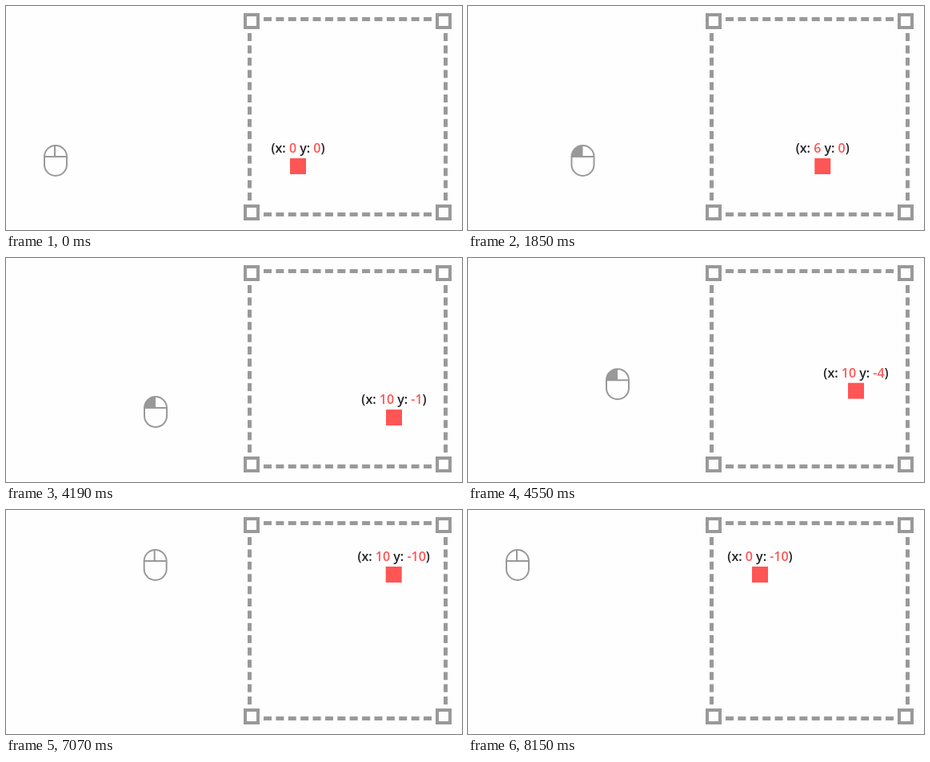
These frames come from a looping animation (570 px wide and 281 px high, 8900 ms). An HTML page:

```html
<!DOCTYPE html>
<html lang="en">
<head>
<meta charset="utf-8">
<title>Drag coordinates</title>
<style>
  html, body { margin: 0; width: 100%; height: 100%; overflow: hidden; background: #fefefe; }
  svg { display: block; width: 570px; height: 281px; }
  text { font: 600 16px "Open Sans", sans-serif; text-anchor: middle; fill: #222; }
  .red { fill: #f55; }
  .frame, .mouse { fill: none; stroke: #999; }
</style>
</head>
<body>
<svg viewBox="0 0 570 281">
  <g class="frame" stroke-width="5" stroke-dasharray="10 5.385">
    <path d="M322 16.5H532M322 261.5H532M304.5 34V244M549.5 34V244"/>
  </g>
  <g class="frame" stroke-width="4">
    <path d="M299 11h16v16h-16zM539 11h16v16h-16zM299 251h16v16h-16zM539 251h16v16h-16z"/>
  </g>
  <g id="mouse" class="mouse" stroke-width="2">
    <path id="button" d="M14 1A13 14 0 0 0 1 15H14z" fill="#999" stroke="none"/>
    <rect x="1" y="1" width="28" height="38" rx="14"/>
    <path d="M14 1V15M1 15H29"/>
  </g>
  <g id="box">
    <rect class="red" width="20" height="20"/>
    <text x="10" y="-7">(x: <tspan class="red" id="xValue">0</tspan> y: <tspan class="red" id="yValue">0</tspan>)</text>
  </g>
</svg>
<script>
const LOOP = 8900, DRAG = 1134;
const [mouse, button, box, xValue, yValue] =
  ["mouse", "button", "box", "xValue", "yValue"].map(id => document.getElementById(id));

// The first drag becomes visible only once it is already under way.
const drags = [
  { start: 1190, shown: 1390, end: 2330 },
  { start: 4122, shown: 4190, end: 5240 },
  { start: 7029, shown: 7070, end: 8150 }
];

const ease = t => t < .5 ? 2 * t * t : 1 - 2 * (1 - t) ** 2;
const place = (el, x, y) => el.setAttribute("transform", `translate(${x} ${y})`);

function progress(time, { start, shown, end }) {
  if (time < shown) return 0;
  if (time >= end) return 1;
  return Math.min(1, (time - start) / DRAG);
}

function draw(now) {
  const time = now % LOOP;
  const [right, up, left] = drags.map(drag => progress(time, drag));
  const x = ease(right) - ease(left), y = ease(up);
  place(mouse, 47 + 125 * x, 174 - 125 * y);
  place(box, 355 + 120 * x, 191 - 120 * y);
  xValue.textContent = Math.round(10 * (right - left));
  yValue.textContent = String(-Math.round(10 * up));
  const pressed = [right, up, left].some(t => t >= .05 && t < .95);
  button.setAttribute("visibility", pressed ? "visible" : "hidden");
}

const origin = performance.now();
function tick() {
  draw(performance.now() - origin);
  requestAnimationFrame(tick);
}
tick();
</script>
</body>
</html>
```
